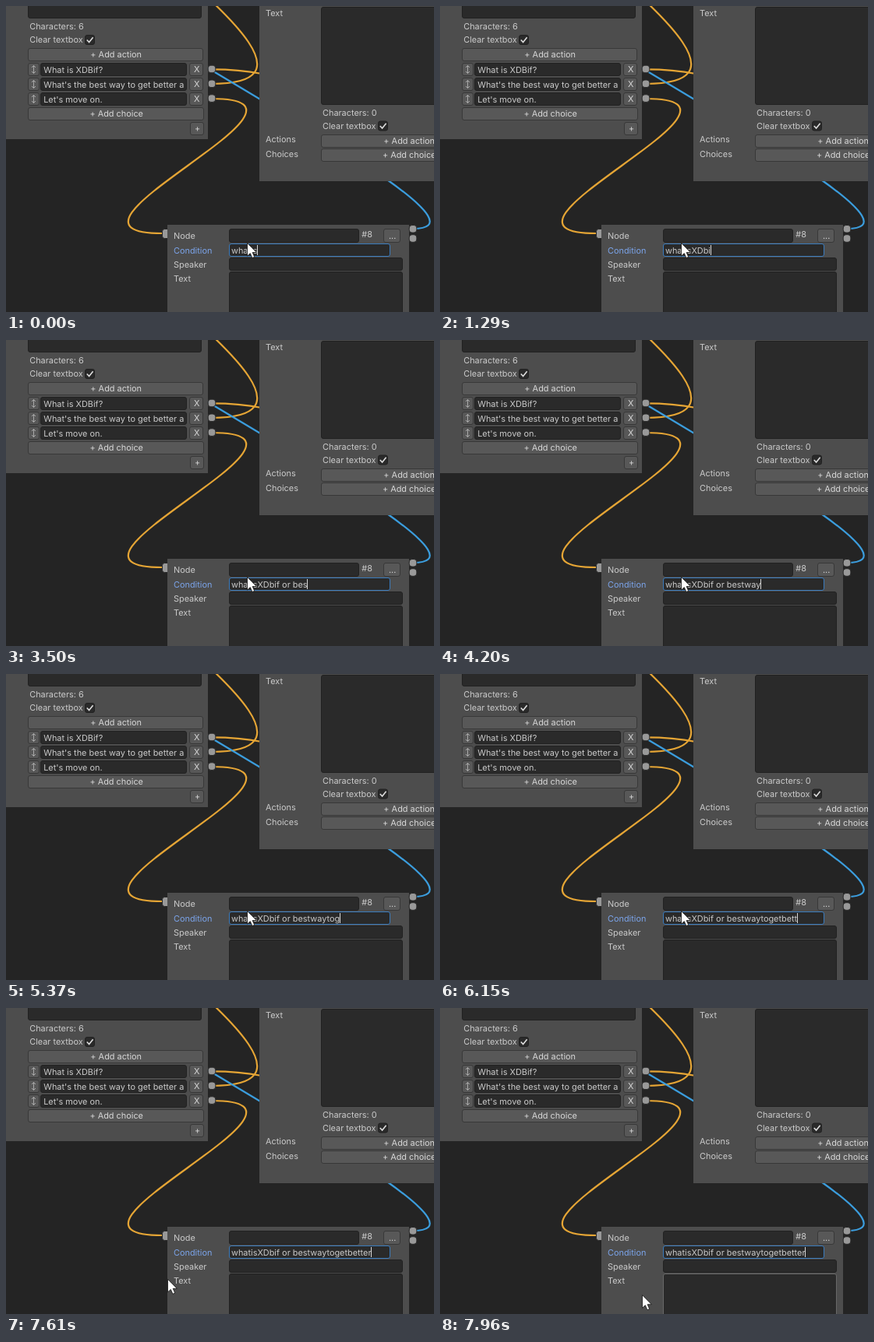
Write an HTML page that moves like this. It is 549 px wide and 393 px high and loops after 7.99 s.

```html
<!DOCTYPE html>
<html lang="en">
<head>
<meta charset="utf-8">
<title>Node editor</title>
<style>
  html, body { margin: 0; width: 100%; height: 100%; overflow: hidden; background: #242424; }
  svg { display: block; }
  text {
    font: 10.9px Inter, "Liberation Sans", sans-serif;
    fill: #cbcbcb;
    white-space: pre;
    text-rendering: geometricPrecision;
  }
  .panel { fill: #4d4d4d; }
  .field { fill: #2a2a2a; stroke: #212121; }
  .field.hover { stroke: #686868; }
  .field.focus { stroke: #3a7bbd; }
  .button { fill: #585858; stroke: #383838; }
  .button + text { fill: #d8d8d8; }
  .edge { fill: none; stroke-width: 2.2; }
  .port { fill: #999; stroke: #272727; }
  .mark { fill: none; stroke: #ddd; stroke-width: 1.6; }
  .icon { fill: none; stroke: #aaa; }
  .focus-label { fill: #7ba4ea; }
</style>
</head>
<body>
<svg id="stage" width="549" height="393" viewBox="0 0 549 393"></svg>
<script>
const LOOP = 7990;
const stage = document.getElementById('stage');

function add(tag, attrs, content = '') {
  const el = document.createElementNS('http://www.w3.org/2000/svg', tag);
  for (const key in attrs) el.setAttribute(key, attrs[key]);
  el.textContent = content;
  return stage.appendChild(el);
}

// Boxes are given by outer edges; the 1px border lies inside.
const box = (cls, x, y, r, b) => add('rect', {
  class: cls, x: x + .5, y: y + .5, width: r - x - 1, height: b - y - 1, rx: 2.5
});
const panel = (x, y, r, b) => add('rect', { class: 'panel', x, y, width: r - x, height: b - y });
const label = (x, y, str, cls = '') => add('text', { x, y, class: cls }, str);
const field = (x, y, r, b) => box('field', x, y, r, b);
const port = (x, y) => add('rect', {
  class: 'port', x: x - 4.8, y: y - 4.8, width: 9.6, height: 9.6, rx: 3.6
});

// An edge leaves its output rightwards and enters its input from the left.
const edge = (color, x1, y1, x2, y2, reach) => add('path', {
  class: 'edge', stroke: color,
  d: `M${x1} ${y1}C${x1 + reach} ${y1} ${x2 - reach} ${y2} ${x2} ${y2}`
});

function button(x, y, r, b, str) {
  box('button', x, y, r, b);
  add('text', { x: (x + r) / 2 + .7, y: (y + b) / 2 + 3.6, 'text-anchor': 'middle' }, str);
}

function checkbox(x, y) {
  field(x, y, x + 13, y + 13);
  add('path', { class: 'mark', d: `M${x + 2.8} ${y + 6.5}l2.8 3 5-6.2` });
}

function textStats(x, y, count) {
  label(x, y, 'Characters: ' + count);
  label(x, y + 17, 'Clear textbox');
  checkbox(Math.round(x + 71), y + 7);
}

// Connections
const ORANGE = '#e5a535', BLUE = '#3b9ddd';
edge(ORANGE, 264, 100, 116, -244, 249);
edge(ORANGE, 264, 119, 201, 292, 175);
edge(BLUE, 522, 286, 17, -114, 165);
add('path', { class: 'edge', stroke: ORANGE, d: 'M264 81.3C290 81.3 308 83 328 87' });

// Left node
panel(0, 0, 259, 171);
field(28, -20, 251, 16);
textStats(30.2, 30, 6);
button(28, 54, 253, 71, '+ Add action');
['What is XDBif?', "What's the best way to get better a", "Let's move on."].forEach((str, i) => {
  const y = 73 + i * 19;
  button(28, y, 43, y + 17, '');
  add('path', {
    class: 'icon',
    d: `M35.5 ${y + 3.5}v10M33 ${y + 6}l2.5-2.5 2.5 2.5M33 ${y + 11}l2.5 2.5 2.5-2.5`
  });
  field(44, y, 232, y + 17);
  label(48.2, y + 12.5, str);
  button(235, y, 253, y + 17, 'X');
  port(264, 81 + i * 18.8);
});
button(28, 130, 254, 147, '+ Add choice');
button(236, 149, 254, 166, '+');

// Right node
panel(325, 0, 549, 225);
label(333, 13, 'Text');
field(404, 1, 629, 127);
textStats(406, 140.5, 0);
label(333, 175, 'Actions');
button(404, 165, 629, 182, '+ Add action');
label(333, 194, 'Choices');
button(404, 183, 629, 200, '+ Add choice');

// Bottom node
add('rect', { class: 'port', x: 200.5, y: 286.5, width: 11, height: 12, rx: 3 });
panel(207, 281, 517, 393);
port(522, 286.3);
port(522, 298.5);
label(215, 299, 'Node');
field(286, 286, 453, 304);
label(456.3, 297, '#8');
button(484, 286, 506, 304, '...');
label(215, 318, 'Condition', 'focus-label');
field(286, 305, 493, 322).classList.add('focus');
label(215, 335.5, 'Speaker');
const speakerField = field(286, 323, 509, 340);
label(215, 353.7, 'Text');
const textField = field(286, 341, 509, 400);

const TYPED_X = 289;
const typed = label(TYPED_X, 318, '');
const caret = add('rect', { y: 307, width: 1, height: 13, fill: '#d8d8d8' });
const pointer = add('path', {
  d: 'M0 0V16.6L3.8 13.1L6.4 19L9.2 17.8L6.7 12H11.8Z',
  fill: '#fff', stroke: '#111', 'stroke-width': .8
});

// Typing and pointer steps
const PHRASE = 'whatisXDbif or bestwaytogetbetter';
const START_LENGTH = 6;
const KEY_TIMES = [
  240, 460, 1110, 1290, 1380, 2030, 2250, 2330, 2480,
  3230, 3320, 3500, 3620, 3930, 4080, 4200, 4970, 5120,
  5370, 5460, 5550, 5790, 5910, 6020, 6140, 6250, 6370
];
const POINTER = [
  [0, 309.5, 304.5], [7490, 301.5, 309.5], [7520, 279, 320], [7540, 255, 330],
  [7560, 234, 338], [7580, 212, 346], [7610, 207.5, 348.3],
  [7890, 214, 351], [7910, 230, 359], [7930, 248, 365], [7960, 259.5, 368.7]
];

function draw() {
  const t = performance.now() % LOOP;
  const str = PHRASE.slice(0, START_LENGTH + KEY_TIMES.filter(k => k <= t).length);
  if (typed.textContent !== str) typed.textContent = str;
  caret.setAttribute('x', Math.round(TYPED_X + typed.getComputedTextLength() - .5));

  const [, x, y] = POINTER.filter(p => p[0] <= t).pop();
  pointer.setAttribute('transform', `translate(${x} ${y})`);
  const inside = x >= 213 && x < 511;
  speakerField.classList.toggle('hover', inside && y >= 323 && y < 341);
  textField.classList.toggle('hover', inside && y >= 341);
  requestAnimationFrame(draw);
}
draw();
</script>
</body>
</html>
```
